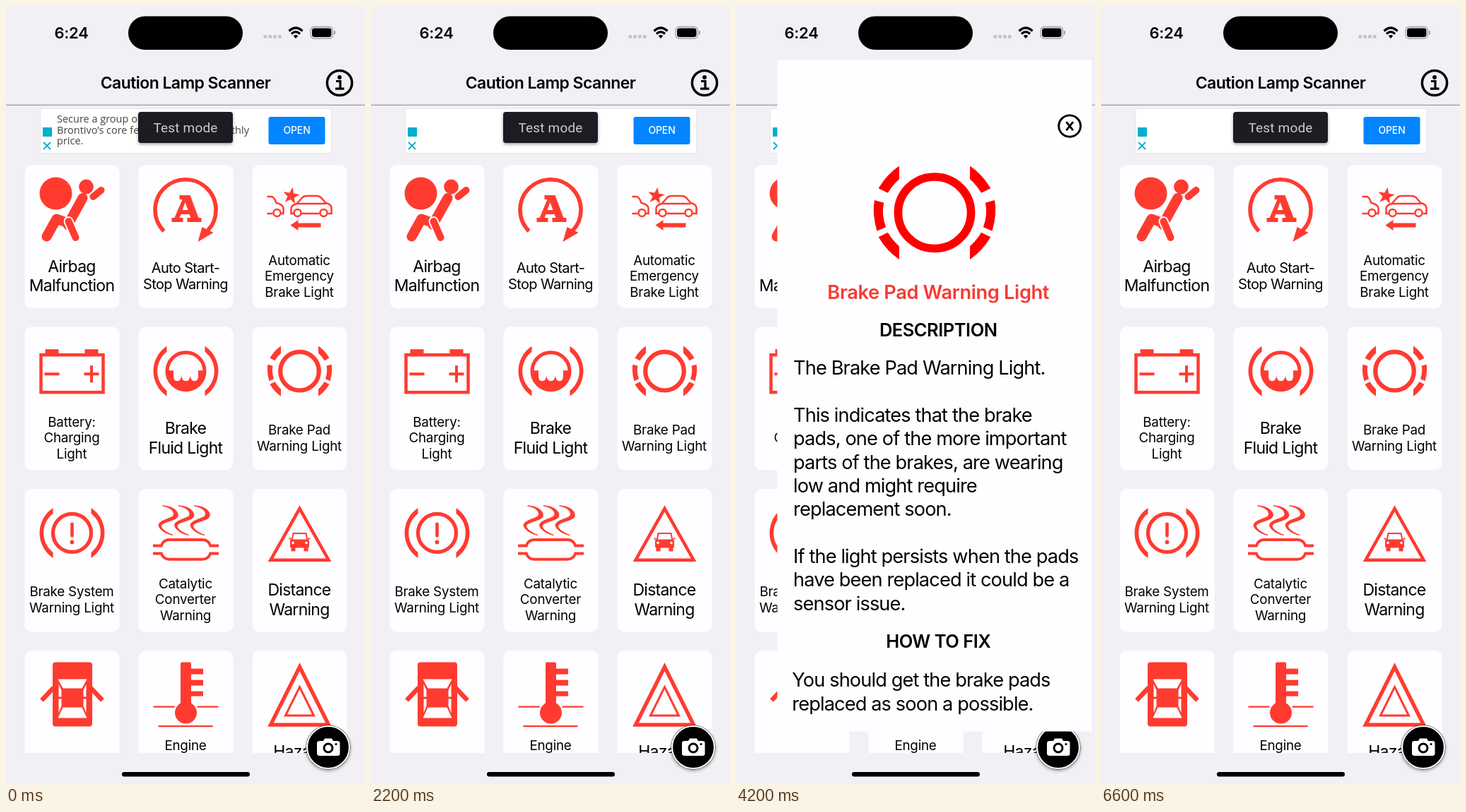
An HTML page that plays this animation: 508 px wide and 1102 px high, repeating every 6700 ms.

```html
<!DOCTYPE html>
<html lang="en">
<head>
<meta charset="utf-8">
<title>Dashboard lights</title>
<style>
  html, body { margin: 0; width: 100%; height: 100%; overflow: hidden; background: #f2f0f4; }
  svg { display: block; width: 508px; height: 1102px; }
  text { font-family: Inter, sans-serif; white-space: pre; }
</style>
</head>
<body>
<svg id="stage" viewBox="0 0 508 1102"></svg>
<script>
const PERIOD = 6700, STEP = 100, MORPH = 420;
const RED = '#ff3b30', PURE_RED = '#fe0000', WHITE = '#fefdff';

// y is the middle of the capital letters
function text(str, x, y, size, { anchor = 'middle', weight = 400, fill = '#000', spacing = 0, font = '' } = {}) {
  return `<text x="${x}" y="${y + size * 0.36}" font-size="${size}" font-weight="${weight}" fill="${fill}"
    text-anchor="${anchor}" letter-spacing="${spacing}em" ${font && `style="font-family:${font},sans-serif"`}>${str}</text>`;
}
const rect = (x, y, w, h, r = 0, attrs = '') => `<rect x="${x}" y="${y}" width="${w}" height="${h}" rx="${r}" ${attrs}/>`;
const circle = (x, y, r, attrs = '') => `<circle cx="${x}" cy="${y}" r="${r}" ${attrs}/>`;
const fill = (d, attrs = '') => `<path d="${d}" ${attrs}/>`;
const line = (d, w, attrs = '') => `<path d="${d}" fill="none" stroke="currentColor" stroke-width="${w}" ${attrs}/>`;
const ring = (r, w) => circle(0, 0, r, `fill="none" stroke="currentColor" stroke-width="${w}"`);
const mirrorX = shape => shape + `<g transform="scale(-1 1)">${shape}</g>`;
const mirrorY = shape => shape + `<g transform="scale(1 -1)">${shape}</g>`;

const ROUND = 'stroke-linecap="round" stroke-linejoin="round"';
const brackets = mirrorX(fill('M-27 -35.5A42.7 42.7 0 0 0 -27 35.5V27.5A35 35 0 0 1 -27 -27.5Z'));
const star = Array.from({ length: 10 }, (_, i) => {
  const r = i % 2 ? 5 : 12.5, a = i * Math.PI / 5 - 1.4;
  return [-12 + r * Math.cos(a), -19 + r * Math.sin(a)].map(v => v.toFixed(1));
}).join(' ');
const steam = fill(`M-33 -38.5C-13 -38 -7 -25 -14 -20.5C-22 -16 -34 -15 -35 -10C-34 -4 -24 1 -18.5 3
  C-27 2 -38 -5 -38.5 -11C-38 -18 -22 -20 -18 -24C-15 -29 -20 -36 -33 -38.5Z`, 'stroke="currentColor"');

// Icons are centred on 0,0 and about 92 wide
const icons = {
  airbag: circle(-23, -22.5, 23) + circle(20, -32, 10.4) +
    line('M30 -18L41 -27', 10, ROUND) + line('M15 -16L-6 22', 14, ROUND) +
    line('M-36 38.5L-22 13.5L-4 20', 14, ROUND) +
    line('M-5 17L5 40', 14, ROUND + ` style="stroke:${WHITE}"`) + line('M-5 17L5 40', 10, ROUND),
  startStop: line('M-31 31A43 43 0 1 1 31 30', 5.6) + fill('M23 25L39 33L17 46Z') +
    fill('M-20 18V12H-16L-5 -14H-9V-20H6L18 12H22V18H2V12H7L5 7H-7L-9 12H-4V18ZM-5 1H3L-1 -10Z', 'fill-rule="evenodd"'),
  emergency: line(`M-8 6H-12V-2Q-11 -6 -4 -8L4 -17Q6 -19 10 -19H24Q27 -19 30 -17L37 -9Q45 -7 45 -2V6H40M3 6H28
    M-4 -8H37M-46 -18H-40Q-36 -18 -33 -9Q-24 -7 -23 -2V6H-27M-38 6H-46`, 2.5) +
    [-32, -3, 34].map(x => circle(x, 5, 5, 'fill="none" stroke="currentColor" stroke-width="2.5"')).join('') +
    `<polygon points="${star}"/>` + fill('M-13 22.5L-2 15V19.5H30V25.5H-2V30Z'),
  battery: rect(-44, -23, 88, 53, 0, 'fill="none" stroke="currentColor" stroke-width="4.5"') +
    rect(-38, -31, 19, 8) + rect(18, -31, 19, 8) + line('M-39 4H-18M17 4H38M27.5 -8V16', 4),
  fluid: brackets + ring(26.5, 5) +
    fill('M-27 -1H-17.5V7Q-17.5 14 -12 14Q-6.5 14 -6.5 5Q-6 14 0 14Q6 14 6.5 5Q6.5 14 12 14Q17.5 14 17.5 7V-1H27A27 27 0 0 1 -27 -1Z'),
  pad: ring(27.3, 6.2) + mirrorX(
    mirrorY(fill('M-26.5 -35.6Q-36 -29 -42 -18.5L-35 -15Q-31.5 -21 -26.5 -25.5Z')) +
    fill('M-45 -9.5Q-47 0 -43.2 14L-36.5 11Q-40 1 -38 -7.5Z')),
  system: brackets + ring(27, 5.2) + rect(-2.3, -15, 4.6, 21, 2) + circle(0, 13, 2.9),
  catalytic: [0, 22.5, 45].map(x => `<g transform="translate(${x})">${steam}</g>`).join('') +
    line('M-46.5 18H-34.7Q-32 9.7 -23 9.7H23Q32 9.7 34.7 18H46.5M-46.5 29.1H-34.7Q-32 37.4 -23 37.4H23Q32 37.4 34.7 29.1H46.5', 4),
  distance: line('M0 -34.5L-41 38.3H41Z', 4.5) + line('M-11 11L-9 0.5H9L11 11M-15 8H-12M12 8H15', 2) +
    rect(-13.5, 9, 27, 12, 2) + rect(-12, 20, 6, 6) + rect(6, 20, 6, 6) +
    circle(-9.5, 14, 1.8, `fill="${WHITE}"`) + circle(9.5, 14, 1.8, `fill="${WHITE}"`),
  doors: rect(-27.5, -46, 56, 91, 4) + mirrorX(line('M-26 -10L-43 8', 6.5)) +
    fill('M-20 -22H21L14 -9H-13ZM-13 18H14L21 33H-20ZM-19 -15L-15 -6V3H-19ZM20 -15L16 -6V3H20ZM-19 6H-15V16L-19 26ZM20 6H16V16L20 26Z', `fill="${WHITE}"`),
  coolant: rect(-7.5, -46, 15, 68, 2) + circle(0, 25.5, 15.5) + rect(6, -37, 18.5, 8) + rect(6, -21, 18.5, 8) + rect(6, -5, 18.5, 7) +
    line('M-46 17H-16M16 17H46M-39 44.5H38', 2.4),
  hazard: line('M0 -39.5L-41 42.5H41Z', 5.4) + line('M0 -11L-20 29.5H20Z', 3),
};

const BIG = 23, MID = 20, SMALL = 18.8;
const cards = [
  ['airbag', BIG, ['Airbag', 'Malfunction']],
  ['startStop', MID, ['Auto Start-', 'Stop Warning']],
  ['emergency', SMALL, ['Automatic', 'Emergency', 'Brake Light']],
  ['battery', SMALL, ['Battery:', 'Charging', 'Light']],
  ['fluid', BIG, ['Brake', 'Fluid Light']],
  ['pad', SMALL, ['Brake Pad', 'Warning Light']],
  ['system', SMALL, ['Brake System', 'Warning Light']],
  ['catalytic', SMALL, ['Catalytic', 'Converter', 'Warning']],
  ['distance', BIG, ['Distance', 'Warning']],
  ['doors', BIG, ['', 'Door Ajar']],
  ['coolant', SMALL, ['Engine', 'Coolant', 'Light']],
  ['hazard', BIG, ['Hazard', 'Lights']],
].map(([icon, size, label], i) => ({ icon, size, label, x: 26.5 + i % 3 * 161, y: 225.3 + (i / 3 | 0) * 229.2, w: 134, h: 203 }));

function drawCard({ icon, size, label, x, y, w, h }) {
  const gap = size * 1.195;
  return rect(x, y, w, h, 10, `fill="${WHITE}"`) +
    `<g transform="translate(${x + 67} ${y + 62.7})" fill="${RED}" color="${RED}">${icons[icon]}</g>` +
    label.map((s, i) => text(s, x + 66.5, y + 157 + (i - (label.length - 1) / 2) * gap, size,
      { spacing: size === SMALL ? -0.012 : -0.032 })).join('');
}

const pages = [
  { card: 0, open: 645, close: 1716, iconHeight: 92, title: 'Airbag Malfunction',
    about: ['This is the air bag', 'malfunction light.', '', 'This could either say Air Bag, SRS,', 'or a person with a deployed', 'airbag.', '',
      'This light can come in a variety of', 'shapes depending on which air', 'bag is malfunctioning.'],
    fix: ['If this light is on, a professional', 'mechanic should be contacted.', '', "If the air bags don't function as"] },
  { card: 5, open: 2793, close: 4091, iconHeight: 71.5, title: 'Brake Pad Warning Light',
    about: ['The Brake Pad Warning Light.', '', 'This indicates that the brake', 'pads, one of the more important', 'parts of the brakes, are wearing',
      'low and might require', 'replacement soon.', '', 'If the light persists when the pads', 'have been replaced it could be a', 'sensor issue.'],
    fix: ['You should get the brake pads', 'replaced as soon a possible.'] },
  { card: 7, open: 5084, close: 6140, iconHeight: 78.7, title: 'Catalytic Converter Warning',
    about: ['This is the Catalytic Converter', 'Overheat sensor warning light.', '', 'The catalytic converter is an', 'important part of any vehicles',
      'engine, so if it is failing, it can lead', 'to reduced engine power and', 'performance.', '', 'The light could also mean that the',
      'component and the engine could', 'be experiencing higher than', 'normal temperatures.'],
    fix: ['Visit a professional mechanic as'] },
];

function drawPage({ card, iconHeight, title, about, fix }) {
  const gap = 38.6, end = 505.5 + (about.length - 1) * gap;
  const body = (lines, x, y) => lines.map((s, i) => text(s, x, y + i * gap, 31, { anchor: 'start', spacing: -0.032 })).join('');
  const heading = (s, y) => text(s, 260, y, 29, { weight: 600, spacing: -0.018 });
  return `<g class="page" clip-path="url(#screen)">` + rect(0, 0, 508, 1102, 0, `fill="${WHITE}"`) +
    `<g transform="translate(472 109)">${ring(17.6, 3.4)}${line('M-5.5 -7L5.5 7M5.5 -7L-5.5 7', 3.2)}</g>` +
    `<g transform="translate(254 251) scale(${154 / iconHeight})" fill="${PURE_RED}" color="${PURE_RED}">${icons[cards[card].icon]}</g>` +
    text(title, 260, 381, 31, { weight: 600, fill: '#f73a31', spacing: -0.012 }) +
    heading('DESCRIPTION', 444) + body(about, 26, 505.5) +
    heading('HOW TO FIX', end + 63) + body(fix, 24, end + 126) + '</g>';
}

const adStyle = { fill: '#444', font: "'Open Sans'" };
const ad = rect(48.5, 145.5, 412, 63, 0, 'fill="#fff" stroke="#e6e5e9"') +
  `<g id="adText">` +
  text('Secure a group of', 72, 160, 14.5, { ...adStyle, anchor: 'start' }) +
  text('Brontivo’s core features', 72, 175.5, 14.5, { ...adStyle, anchor: 'start' }) +
  text('monthly', 344, 175.5, 14.5, { ...adStyle, anchor: 'end' }) +
  text('price.', 72, 191, 14.5, { ...adStyle, anchor: 'start' }) + '</g>' +
  rect(52, 172, 13, 13, 0, 'fill="#00aecd"') + line('M53 193L63 203M63 193L53 203', 1.8, 'color="#00aecd"') +
  rect(371.5, 157, 80, 39, 3, 'fill="#0285ff"') + text('OPEN', 411.5, 176, 14, { weight: 500, fill: '#fff', spacing: -0.01 }) +
  rect(187, 150, 134, 44, 4, 'fill="#1e1c24" filter="url(#shadow)"') +
  text('Test mode', 254, 172, 19, { fill: '#cbcad0', font: 'Roboto', spacing: 0.01 });

const header = text('Caution Lamp Scanner', 254, 109, 23, { weight: 600, spacing: -0.025 }) +
  `<g transform="translate(472 109)">${ring(17.6, 3.5)}${circle(0, -8, 2.9)}${line('M-5 -2.5H1V8M-6 8.2H6.5', 3.2)}</g>` +
  rect(0, 139.8, 508, 1, 0, 'fill="#858488"');

const cameraButton = circle(456, 1050, 31.5, 'filter="url(#shadow)"') + circle(456, 1050, 30, 'stroke="#fff" stroke-width="2.2"') +
  fill('M444 1041H449L451 1037.5H461L463 1041H469Q472.5 1041 472.5 1044V1059Q472.5 1062 469 1062H444Q440 1062 440 1059V1044Q440 1041 444 1041Z', 'fill="#fff"') +
  circle(456, 1051, 6, 'fill="none" stroke="#000" stroke-width="3"') + circle(467, 1045.5, 1.6);

const statusBar = text('6:24', 92.5, 38.5, 22, { weight: 600, spacing: -0.01 }) + rect(173, 14.5, 162, 47.5, 23.7) +
  [0, 1, 2, 3].map(i => rect(364.5 + i * 6.8, 41, 4.7, 4.7, 1.5, 'fill="#c3c2c6"')).join('') +
  line('M400.5 35.5Q410 26.5 419.5 35.5M404 39.5Q410 33.8 416 39.5', 3.2) + fill('M406.8 42.5Q410 39.6 413.2 42.5L410 46Z') +
  rect(431, 29.5, 31.5, 16.5, 5, 'fill="none" stroke="#a09fa3" stroke-width="1.3"') + rect(433, 31.5, 27.5, 12.5, 3.4) +
  rect(464, 35, 2, 5.5, 1, 'fill="#a09fa3"');

document.getElementById('stage').innerHTML = `<defs>
  <clipPath id="screen">${rect(0, 0, 508, 1102)}</clipPath>
  <clipPath id="list">${rect(0, 141, 508, 917)}</clipPath>
  <filter id="shadow" x="-20%" y="-20%" width="140%" height="150%"><feDropShadow dx="0" dy="2" stdDeviation="2" flood-opacity=".35"/></filter>
  </defs>` + rect(0, 0, 508, 1102, 0, 'fill="#f2f0f4"') + header + ad +
  `<g clip-path="url(#list)">${cards.map(drawCard).join('')}</g>` + cameraButton +
  pages.map(drawPage).join('') + statusBar + rect(164, 1085, 181, 6.5, 3.2);

const pageNodes = document.querySelectorAll('.page'), adText = document.getElementById('adText');
const ease = v => { const x = Math.min(1, Math.max(0, v)); return x * x * (3 - 2 * x); };
const mix = (a, b, p) => a + (b - a) * p;

function frame(now) {
  const t = Math.floor(now % PERIOD / STEP) * STEP;
  adText.setAttribute('opacity', Math.max(0, 1 - t / 700));
  pages.forEach(({ card, open, close }, i) => {
    const { x, y, w, h } = cards[card];
    const p = ease((t - open) / MORPH) - ease((t - close) / MORPH);
    pageNodes[i].setAttribute('display', t >= open && t < close + MORPH ? 'inline' : 'none');
    pageNodes[i].setAttribute('transform',
      `translate(${mix(x, 0, p)} ${mix(y, 0, p)}) scale(${mix(w / 508, 1, p)} ${mix(h / 1102, 1, p)})`);
  });
  requestAnimationFrame(frame);
}
frame(0);
requestAnimationFrame(frame);
</script>
</body>
</html>
```
